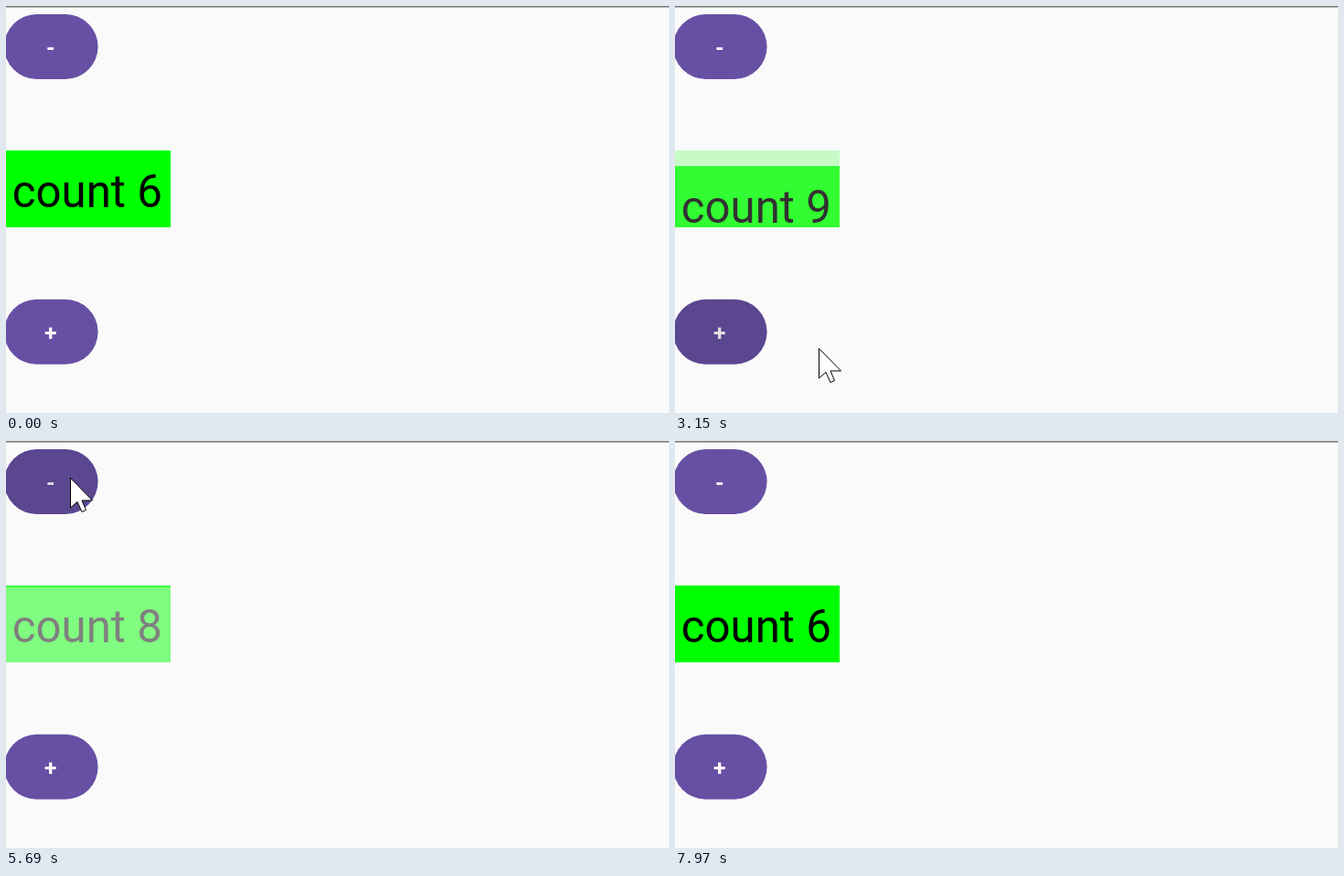
These frames come from a looping animation (725x445 px, 9.18 s). An HTML page:

```html
<!DOCTYPE html>
<html lang="en">
<head>
<meta charset="utf-8">
<title>Counter</title>
<style>
  html, body { margin: 0; width: 100%; height: 100%; overflow: hidden; background: #fafafa; }
  svg { display: block; width: 725px; height: 445px; }
  text { font-family: Roboto, sans-serif; }
  .button rect { x: -2px; width: 102.6px; height: 71px; rx: 35.5px; fill: #6750a4; }
  .button .ripple { fill: #000; opacity: 0; }
  .button text { font-size: 24.7px; font-weight: 600; fill: #fff; text-anchor: middle; }
  .count rect { fill: #0f0; }
  .count text { font-size: 49.2px; }
</style>
</head>
<body>
<svg viewBox="0 0 725 445">
  <defs>
    <clipPath id="window"><rect y="158" width="180" height="84"/></clipPath>
  </defs>
  <rect width="725" height="445" fill="#fafafa"/>
  <rect width="725" height="1.5" fill="#757575"/>
  <g class="button" transform="translate(0 9)">
    <rect/>
    <text x="48.7" y="45">-</text>
    <rect class="ripple" id="minus"/>
  </g>
  <g class="button" transform="translate(0 320.8)">
    <rect/>
    <text x="48.7" y="45.2">+</text>
    <rect class="ripple" id="plus"/>
  </g>
  <g clip-path="url(#window)">
    <g class="count" id="leaving"><rect y="158" width="180" height="84"/><text x="6.8" y="220"></text></g>
    <g class="count" id="entering"><rect y="158" width="180" height="84"/><text x="6.8" y="220"></text></g>
  </g>
  <path id="cursor" d="M.5 .5V33L8 26.5L13 37.5L17.5 35.5L13 25H24.5Z" fill="#fff" stroke="#000"/>
</svg>
<script>
const LOOP = 9180, HEIGHT = 84, REFRESH = 47, FIRST_COUNT = 6;
const $ = id => document.getElementById(id);
const clamp = v => Math.min(1, Math.max(0, v));
const mix = (a, b, u) => a + (b - a) * u;
const smooth = u => u * u * (3 - 2 * u);

const taps = [
  { press: 1170, delay: 15, step: 1 },
  { press: 2020, delay: 20, step: 1 },
  { press: 2970, delay: 39, step: 1 },
  { press: 4180, delay: 42, step: -1 },
  { press: 5500, delay: 101, step: -1 },
  { press: 6710, delay: 8, step: -1 }
];

const moves = [
  { from: 380, to: 900, at: u => {
    const e = 1 - (1 - u) ** 2;
    return [mix(199, 67, e), mix(436, 349, e)];
  } },
  // A wide arc to the right, from one button to the other
  { from: 2970, to: 3820, at: u => [
    mix(mix(67, 70, u), 598, Math.sin(Math.PI * u) ** 4),
    mix(349, 40, smooth(clamp((u - 0.2) / 0.75))) + 26 * Math.sin(Math.PI * clamp(u / 0.44))
  ] },
  { from: 7650, to: 7970, at: u => [mix(70, 730, u * u), mix(40, 450, u * u)] }
];

// The screen refreshes at a fixed pace, counted from the latest input
const inputs = [0, ...taps.map(p => p.press), ...moves.map(m => m.from)];
function refreshTime(t) {
  const last = Math.max(...inputs.filter(s => s <= t));
  return last + REFRESH * Math.floor((t - last) / REFRESH + 0.3);
}

// What is left of a critically damped spring, stiffness 400
function springLeft(ms) {
  const u = Math.max(0, ms) / 50;
  const left = (1 + u) * Math.exp(-u);
  return left < 0.005 ? 0 : left;
}

// cubic-bezier(.4, 0, .2, 1)
function fastOutSlowIn(x) {
  let lo = 0, hi = 1;
  for (let i = 0; i < 24; i++) {
    const s = (lo + hi) / 2, q = 1 - s;
    if (1.2 * s * q * q + 0.6 * s * s * q + s ** 3 < x) lo = s; else hi = s;
  }
  return smooth(lo);
}

function place(id, value, y, alpha) {
  const group = $(id);
  group.lastChild.textContent = "count " + value;
  group.setAttribute("transform", `translate(0 ${Math.round(y)})`);
  group.setAttribute("opacity", alpha);
}

function drawCount(t) {
  const done = taps.filter(p => p.press + p.delay <= t);
  const { press, delay, step } = done.at(-1) || { press: -LOOP, delay: 0, step: 1 };
  const value = done.reduce((sum, p) => sum + p.step, FIRST_COUNT);
  const age = t - press - delay;
  const left = springLeft(age);
  const away = step > 0 ? left : fastOutSlowIn(clamp(age / 1000)) - 1;
  place("leaving", value - step, step > 0 ? HEIGHT * (left - 1) : 0, left);
  place("entering", value, HEIGHT * away, 1 - left);
}

function drawRipple(id, step, t) {
  const tap = taps.filter(p => p.step === step && p.press <= t).pop();
  const age = tap ? t - tap.press : LOOP;
  $(id).style.opacity = 0.12 * clamp((age + 20) / 75) * clamp((350 - age) / 130);
}

function drawCursor(t) {
  const move = moves.filter(m => m.from <= t).pop();
  const visible = move && t < moves.at(-1).to;
  $("cursor").style.display = visible ? "" : "none";
  if (!visible) return;
  const spot = move.at(clamp((t - move.from) / (move.to - move.from)));
  $("cursor").setAttribute("transform", `translate(${spot.map(Math.round).join(" ")})`);
}

const begin = performance.now();
function frame() {
  const t = refreshTime((performance.now() - begin) % LOOP);
  drawCount(t);
  drawRipple("plus", 1, t);
  drawRipple("minus", -1, t);
  drawCursor(t);
  requestAnimationFrame(frame);
}
frame();
</script>
</body>
</html>
```
